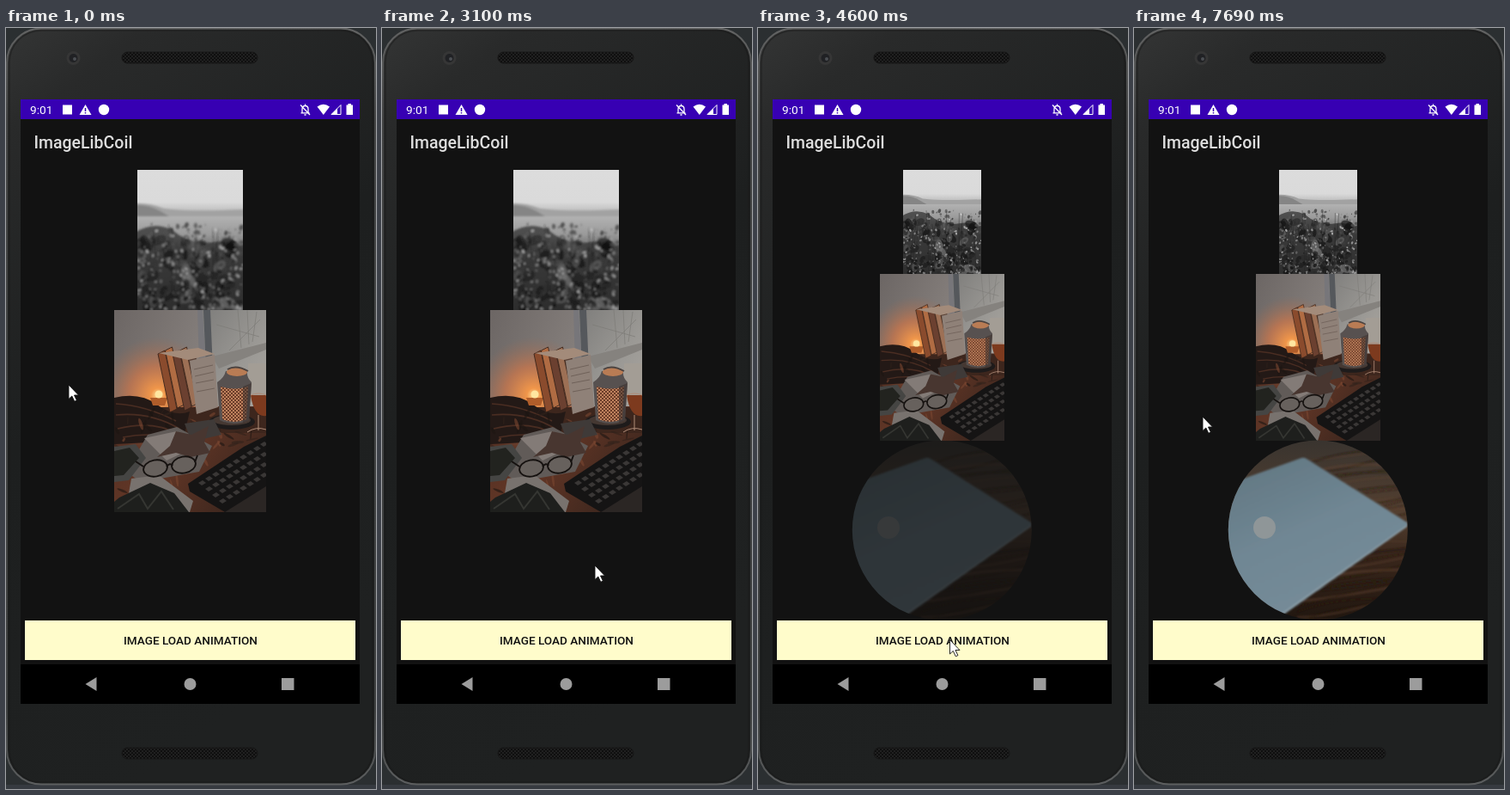
Animation, 431 px wide and 885 px high, one loop 7.76 s. Source, as an HTML page:

```html
<!DOCTYPE html>
<html lang="en">
<head>
<meta charset="utf-8">
<title>Image load animation</title>
<style>
  html, body { margin: 0; width: 100%; height: 100%; overflow: hidden; background: #2b2f31; }
  svg { display: block; width: 431px; height: 885px; }
  text { font-family: Roboto, "Noto Sans", sans-serif; font-weight: 500; }
</style>
</head>
<body>
<svg viewBox="0 0 431 885" xmlns="http://www.w3.org/2000/svg">
  <defs>
    <linearGradient id="body" x1="0" y1="0" x2=".35" y2="1">
      <stop offset="0" stop-color="#343535"/><stop offset=".12" stop-color="#292a2a"/>
      <stop offset=".5" stop-color="#1d1f1f"/><stop offset="1" stop-color="#1f2121"/>
    </linearGradient>
    <linearGradient id="rim" x1="0" y1="0" x2="0" y2="1">
      <stop offset="0" stop-color="#626363"/><stop offset=".12" stop-color="#444545"/>
      <stop offset=".9" stop-color="#3e4040"/><stop offset="1" stop-color="#5c5e5f"/>
    </linearGradient>
    <pattern id="mesh" width="4" height="4" patternUnits="userSpaceOnUse">
      <rect width="4" height="4" fill="#202020"/>
      <circle cx="1" cy="1" r="1.1" fill="#0c0c0c"/><circle cx="3" cy="3" r="1.1" fill="#0c0c0c"/>
    </pattern>
    <pattern id="holes" width="4" height="4" patternUnits="userSpaceOnUse">
      <rect width="4" height="4" fill="#6b3c28"/>
      <circle cx="1" cy="1" r="1" fill="#dc9a70"/><circle cx="3" cy="3" r="1" fill="#dc9a70"/>
    </pattern>
    <linearGradient id="field" x1="0" y1="0" x2="0" y2="1">
      <stop offset="0" stop-color="#dcdcdc"/><stop offset=".23" stop-color="#dadada"/>
      <stop offset=".32" stop-color="#b4b4b4"/><stop offset=".46" stop-color="#9a9a9a"/>
      <stop offset=".62" stop-color="#505050"/><stop offset="1" stop-color="#202020"/>
    </linearGradient>
    <linearGradient id="wall" x1="0" y1="0" x2="1" y2=".4">
      <stop offset="0" stop-color="#6c6664"/><stop offset="1" stop-color="#86807d"/>
    </linearGradient>
    <linearGradient id="pane" x1="0" y1="0" x2="1" y2="1">
      <stop offset="0" stop-color="#7e7d7b"/><stop offset=".6" stop-color="#9b9995"/>
      <stop offset="1" stop-color="#a9a59f"/>
    </linearGradient>
    <radialGradient id="glow">
      <stop offset="0" stop-color="#ffe09a"/><stop offset=".12" stop-color="#f0964a"/>
      <stop offset=".5" stop-color="#c9754a" stop-opacity=".75"/>
      <stop offset="1" stop-color="#a06a50" stop-opacity="0"/>
    </radialGradient>
    <linearGradient id="desk" x1="0" y1="0" x2="1" y2="1">
      <stop offset="0" stop-color="#432a20"/><stop offset=".55" stop-color="#623626"/>
      <stop offset="1" stop-color="#30211b"/>
    </linearGradient>
    <linearGradient id="lid" x1=".1" y1="0" x2=".6" y2="1">
      <stop offset="0" stop-color="#617681"/><stop offset=".5" stop-color="#708794"/>
      <stop offset="1" stop-color="#768c99"/>
    </linearGradient>
    <linearGradient id="wood" x1="0" y1="0" x2="0" y2="1">
      <stop offset="0" stop-color="#39342f"/><stop offset=".4" stop-color="#533f30"/>
      <stop offset=".65" stop-color="#38261b"/><stop offset="1" stop-color="#20160f"/>
    </linearGradient>
    <filter id="soft"><feGaussianBlur stdDeviation=".9"/></filter>
    <filter id="fine"><feGaussianBlur stdDeviation=".6"/></filter>
    <clipPath id="meadowClip"><rect x="153" y="165" width="123" height="163"/></clipPath>
    <clipPath id="deskClip"><rect x="126" y="328" width="177" height="235"/></clipPath>
    <clipPath id="roundClip"><circle cx="214.3" cy="584" r="104.5"/></clipPath>
  </defs>

  <!-- phone -->
  <rect width="431" height="885" fill="#2b2f31"/>
  <rect y="880" width="431" height="5" fill="#363a40"/>
  <rect x="1" y=".5" width="429" height="879" rx="40" fill="url(#body)" stroke="url(#rim)" stroke-width="2"/>
  <rect x="4" y="3" width="423" height="874" rx="37" fill="none" stroke="#181919" stroke-width="1.5" opacity=".5"/>
  <rect x="135" y="28" width="158" height="13" rx="6.5" fill="url(#mesh)" stroke="#161616"/>
  <rect x="135" y="837" width="158" height="13" rx="6.5" fill="url(#mesh)" stroke="#161616"/>
  <circle cx="78.5" cy="35" r="8" fill="#363636"/>
  <circle cx="78.5" cy="35" r="5" fill="#202124"/>
  <circle cx="80" cy="36" r="2" fill="#4b4e53"/>

  <!-- screen -->
  <rect x="17" y="83" width="395" height="703" fill="#121212"/>
  <rect x="17" y="83" width="395" height="23" fill="#3700b3"/>
  <rect x="17" y="740" width="395" height="46"/>
  <g fill="#fff">
    <text x="28" y="100" font-size="13.7" style="font-weight:400">9:01</text>
    <rect x="66" y="89.5" width="11" height="11"/>
    <path d="M92.5 89l7 12h-14z"/>
    <circle cx="114" cy="95" r="6.2"/>
    <path d="M362.5 91.5q7.2-5.5 14.5 0l-7.200 9.500z"/>
    <path d="M398.5 89.5v-1.500h3.500v1.500h2v11.500h-7.500v-11.500z"/>
    <path d="M379 100.5L390 89.5V100.5z" fill="none" stroke="#fff"/>
    <path d="M378.5 101l7.500-7.500v7.500z"/>
  </g>
  <path d="M92.5 93v4M92.5 98v1.500" stroke="#3700b3" stroke-width="1.5"/>
  <path d="M345 98.5v-4q0-4 3.500-4t3.500 4v4M343.5 98.800h10M343 89.500l11 11.500M348.500 88.500v2M347.500 101h2"
    fill="none" stroke="#fff" stroke-width="1.3"/>
  <text x="32.5" y="140" font-size="19.5" fill="#dedede">ImageLibCoil</text>
  <g fill="#9c9c9c">
    <path d="M92.5 763l13-8v16z"/>
    <circle cx="214.5" cy="763" r="7"/>
    <rect x="321" y="756" width="14.5" height="14"/>
  </g>

  <!-- photos -->
  <g id="meadow"><g clip-path="url(#meadowClip)">
    <rect x="153" y="165" width="123" height="163" fill="url(#field)"/>
    <g filter="url(#soft)">
      <path d="M150 204q18-1 34 6 30 4 95 1v8H150z" fill="#a2a2a2"/>
      <path d="M150 206q16-1 30 7l10 6H150z" fill="#858585"/>
      <path d="M150 238q22-14 44-3 20 18 48 14 18-4 37 8v75H150z" fill="#333" opacity=".75"/>
      <g id="foliage"></g>
    </g>
  </g></g>

  <g id="still"><g clip-path="url(#deskClip)"><g filter="url(#fine)">
    <rect x="126" y="328" width="177" height="235" fill="url(#desk)"/>
    <rect x="126" y="328" width="110" height="112" fill="url(#wall)"/>
    <rect x="229" y="328" width="74" height="112" fill="url(#pane)"/>
    <path d="M240 382l63-16v8l-55 22z" fill="#85827e"/>
    <path d="M223 328h6l4 65h-8z" fill="#77767a"/><path d="M230 328h8l3 70h-8z" fill="#55585c"/>
    <path d="M270 328l4 44M281 328l2 40M292 330l-5 35M245 345l50 14M260 375l36-36"
      stroke="#7d7b77" fill="none" opacity=".7"/>
    <path d="M282 390h21v45h-21z" fill="#a39d95"/>
    <circle cx="177" cy="427" r="68" fill="url(#glow)"/>
    <path d="M126 441h177v30H126z" fill="#3d261d"/>
    <path d="M126 430q30-7 50 8t38 8l-8 34-80 4z" fill="#231916"/>
    <path d="M128 437q35 2 70 20M128 450q40-4 74 16M130 466q40-10 72 6M136 476q30-6 60 0"
      fill="none" stroke="#4a2d22" stroke-width="1.6"/>
    <path d="M168 430h20l-3 9h-14z" fill="#b05d2a"/><circle cx="178" cy="426" r="4.5" fill="#ffe6a0"/>
    <g id="books"></g>
    <path d="M214 387l29-7 4 61-25 8z" fill="#8f8178"/>
    <path d="M219 397l22-5M220 405l22-5M221 413l21-4M222 423l21-4" stroke="#6f6159"/>
    <g id="clutter"></g>
    <ellipse cx="263" cy="458" rx="27" ry="9" fill="#1e1b1b"/>
    <ellipse cx="263" cy="456" rx="22" ry="6" fill="#453832"/>
    <path d="M256 399h25q-1 7 5 13l-3 44q-18 8-34 0l-3-44q8-5 10-13z" fill="#575150"/>
    <path d="M250 417q16 5 32 0l-2 38q-14 6-28 0z" fill="url(#holes)"/>
    <path d="M276 417l10-4-3 43-7 3z" fill="#3b302c" opacity=".55"/>
    <ellipse cx="269" cy="400" rx="12" ry="5" fill="#b97c54"/>
    <path d="M258 397q10-6 24 2" fill="none" stroke="#4b4340" stroke-width="2"/>
    <path d="M285 427h18v24q-14 2-18-24z" fill="#7d3a1e"/>
    <path d="M285 427q9-4 18 0M294 450v18M281 470q10-7 22-3" fill="none" stroke="#b08c78"/>
    <path d="M165 473l34-9 41 22-15 30-68 12-17-12z" fill="#615b58"/>
    <path d="M208 460l34-5 9 18-35 8z" fill="#3f3a38"/>
    <path d="M161 477l38-8 26 16-38 18z" fill="#837b77"/>
    <path d="M198 469l18 4 20-10-5 19 7 12-23 5-17-5-22 5 15-13z" fill="#483630"/>
    <path d="M126 487l25-3 12 16-20 26-17 2z" fill="#454543"/>
    <path d="M126 492l18-4 11 12-18 20-11 1z" fill="#22231f"/>
    <path d="M146 524l32-4 40 30-4 13h-75z" fill="#78726e"/>
    <path d="M132 546l36-17 28 12 17 22h-87v-12z" fill="#1e1f1d"/>
    <path d="M130 559l25-17 10 17 16-20 14 21" fill="none" stroke="#353632" stroke-width="2"/>
    <g fill="#77706b" fill-opacity=".3" stroke="#15110f" stroke-width="1.9">
      <ellipse cx="174" cy="512" rx="14" ry="9.500" transform="rotate(-10 174 512)"/>
      <ellipse cx="207" cy="508" rx="14" ry="9.500" transform="rotate(-10 207 508)"/>
      <path d="M187 510q4-5 7-1M160 510l-9-6M220 505l3-8" fill="none"/>
    </g>
    <path d="M212 530l65-43 26-13v89h-48l-41-24z" fill="#151414"/>
    <g id="keys"></g>
    <path d="M255 563l48-30v30z" fill="#2b2624"/>
  </g></g></g>

  <g id="round" clip-path="url(#roundClip)" opacity="0">
    <rect x="109" y="479" width="211" height="211" fill="url(#wood)"/>
    <g filter="url(#soft)">
      <g id="grain" fill="none"></g>
      <path d="M105 536l20-11 70-25q3-1 6 1l117 74q2 2 0 5L172 684l-67-15z" fill="url(#lid)"/>
      <path d="M318 579L173 681" stroke="#93a4ac" stroke-width="1.2"/>
    </g>
    <circle cx="152" cy="581" r="13" fill="#8f9698"/>
  </g>

  <rect x="22" y="689" width="385" height="46" fill="#fffccb"/>
  <text x="215" y="717" font-size="13.55" text-anchor="middle" fill="#111">IMAGE LOAD ANIMATION</text>
  <circle id="tap" cx="222.5" cy="711.5" r="12" fill="#ff0" opacity="0"/>
  <path id="cursor" d="M0 0V16.5L3.8 13 6.8 19.3 9.4 18.1 6.5 12H11.5z" fill="#fff" stroke="#111" stroke-width=".9"/>
</svg>

<script>
const LOOP = 7760, STEP = 70, SHRINK = 3990;
const $ = id => document.getElementById(id);

let seed = 17;
const random = () => (seed = seed * 16807 % 2147483647) / 2147483647;
const between = (a, b) => a + (b - a) * random();
const repeat = (n, make) => Array.from({ length: n }, (_, i) => make(i)).join('');

function blob(x, y, rx, ry, fill, opacity) {
  return `<ellipse cx="${x}" cy="${y}" rx="${rx}" ry="${ry}" fill="${fill}" opacity="${opacity}"
    transform="rotate(${between(0, 180)} ${x} ${y})"/>`;
}

const gray = level => `rgb(${level},${level},${level})`;

function bush(i) {
  const y = between(246, 328), size = between(5, 11);
  return blob(between(153, 276), y, size, size * .6, gray(i % 3 ? between(10, 40) : between(85, 125)), .6);
}

function leaf() {
  const y = 228 + 100 * Math.pow(random(), .75);
  const depth = (y - 228) / 100;
  const bright = random() < .45;
  const level = bright ? between(110, 205) - depth * 20 : between(5, 45) + (1 - depth) * 50;
  const size = between(.8, bright ? 2.4 : 3.5);
  return blob(between(153, 276), y, size, size * .7, gray(level), .8);
}

function stem() {
  const x = between(155, 270);
  return `<path d="M${x} 325q${between(-8, 8)}-40 ${between(-6, 10)}-${between(55, 100)}"
    fill="none" stroke="#222" opacity=".5"/>`;
}

$('foliage').innerHTML = repeat(55, bush) + repeat(430, leaf) + repeat(14, stem);

$('books').innerHTML = repeat(5, i => {
  const x = 177 + i * 8.5, y = 379 - i % 2 * 4;
  const fill = ['#8a4b2d', '#b06c43', '#6b4030', '#9d7055', '#5b4338'][i];
  return `<path d="M${x} ${y}l8-4 14 ${68 - i}-8 4z" fill="${fill}" stroke="#3b251b" stroke-width=".9"/>`;
}) + '<path d="M178 378l46-6 19 7-31 7z" fill="#a38b7a"/>';

$('clutter').innerHTML = repeat(70, i => blob(between(128, 300), between(446, 555),
  between(2, 8), between(.6, 2), ['#1d1613', '#7a4630', '#30211b'][i % 3], .6));

$('keys').innerHTML = repeat(40, i => {
  const column = i % 10, row = Math.floor(i / 10);
  const x = 224 + column * 8 + row * 8, y = 529 - column * 5 + row * 7;
  return `<path d="M${x} ${y}l5-3 4 3-5 3z" fill="#3a3736"/>`;
});

$('grain').innerHTML = repeat(36, i => {
  const y = 490 + i * 6;
  const color = i % 3 ? '#24180f' : '#644530';
  return `<path d="M190 ${y + 15}q50 ${between(-22, 4)} 132 ${between(-30, -10)}"
    stroke="${color}" stroke-width="${between(1, 3)}" opacity=".5"/>`;
});

// Pointer moves: start time, number of steps, points evenly spaced in time.
const MOVES = [
  [960, 12, [[73, 415], [77, 432], [86, 485], [98, 552], [114, 621]]],
  [1800, 8, [[114, 621], [133, 658], [180, 664], [215, 600], [226, 499]]],
  [2750, 12, [[226, 499], [238, 520], [250, 590], [246, 660], [230, 705], [224, 710]]],
  [3580, 1, [[224, 710], [223.5, 711.5]]],
  [5580, 1, [[223.5, 711.5], [221, 713.5]]],
  [5720, 12, [[221, 713.5], [137, 686], [38, 637], [3, 550], [20, 440], [52, 386], [79, 427]]],
  [6560, 3, [[79, 427], [81, 453]]],
  [6900, 2, [[81, 453], [80, 452]]]
];
const FADE = [[SHRINK, 0], [4600, .3], [4880, .34], [5580, .8], [6000, 1]];
const TAP = [[4120, .7], [4390, 0]];

const mix = (a, b, p) => a + (b - a) * p;

function track(keys, t) {
  const next = keys.findIndex(key => key[0] > t);
  if (next < 0) return keys[keys.length - 1][1];
  if (next === 0) return keys[0][1];
  const [t0, a] = keys[next - 1], [t1, b] = keys[next];
  return mix(a, b, (t - t0) / (t1 - t0));
}

function pointer(t) {
  const move = MOVES.filter(([start]) => start <= t).pop();
  if (!move) return MOVES[0][2][0];
  const [start, steps, points] = move;
  const step = Math.min(Math.floor((t - start) / STEP) + 1, steps);
  const place = step / steps * (points.length - 1);
  const i = Math.min(Math.floor(place), points.length - 2);
  return points[i].map((v, axis) => mix(v, points[i + 1][axis], place - i));
}

// Maps a photo's large box to its small one.
function fit(id, small, [x, y, w, h], [x2, y2, w2, h2]) {
  $(id).setAttribute('transform', small
    ? `translate(${x2} ${y2}) scale(${w2 / w} ${h2 / h}) translate(${-x} ${-y})` : '');
}

let wasSmall = null;
function draw(t) {
  const small = t >= SHRINK;
  if (small !== wasSmall) {
    fit('meadow', small, [153, 165, 123, 163], [169, 165, 91, 121]);
    fit('still', small, [126, 328, 177, 235], [142, 286, 145, 194]);
    wasSmall = small;
  }
  const held = 4600 + Math.floor((t - 4600) / STEP) * STEP;
  $('round').setAttribute('opacity', track(FADE, held));
  $('tap').setAttribute('opacity', t < 3780 ? 0 : track(TAP, t));
  $('cursor').setAttribute('transform', `translate(${pointer(t)})`);
}

const begin = performance.now();
function tick() {
  draw((performance.now() - begin) % LOOP);
  requestAnimationFrame(tick);
}
tick();
</script>
</body>
</html>
```
